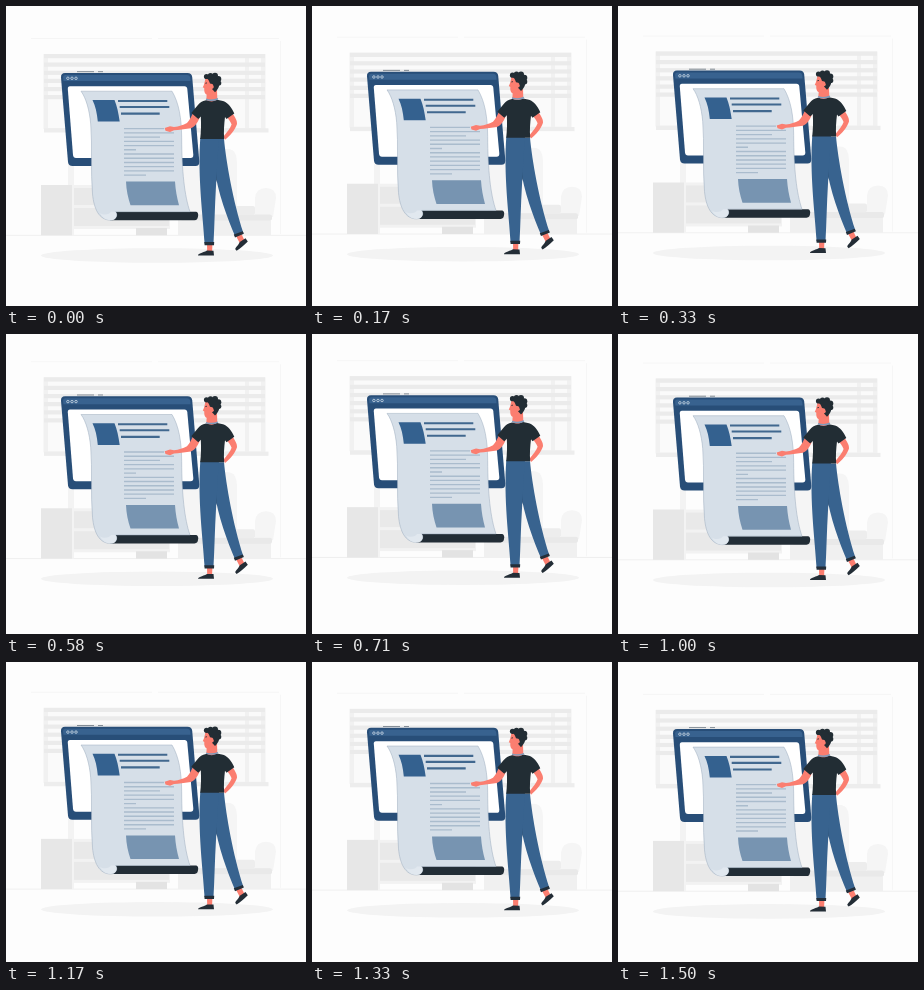
Write an HTML page that moves like this. It is 300 px wide and 300 px high and loops after 1540 ms.

```html
<!DOCTYPE html>
<html lang="en">
<head>
<meta charset="utf-8">
<title>Reading a page</title>
<style>
html, body { margin: 0; width: 100%; height: 100%; overflow: hidden; background: #fdfdfd; }
svg { display: block; width: 100vw; height: 100vh; }
</style>
</head>
<body>
<svg viewBox="0 0 300 300" xmlns="http://www.w3.org/2000/svg">
<g id="scene">
  <!-- room -->
  <g fill="none" stroke="#f4f4f4" stroke-width=".8">
    <path d="M25 32.5H146M152 32.5H273M274.5 35V228"/>
    <path d="M0 229.3H300" stroke="#ececec"/>
  </g>
  <rect x="37.500" y="48" width="222" height="75" fill="#f1f1f1"/>
  <rect x="42" y="52" width="197" height="70" fill="#fafafa"/>
  <rect x="243" y="52" width="12" height="70" fill="#fafafa"/>
  <g id="slats" fill="#ebebeb"></g>
  <rect x="38" y="122.300" width="224.500" height="4.200" fill="#ededed"/>

  <rect x="62" y="158" width="6" height="71" fill="#f3f3f3"/>
  <rect x="35" y="179" width="31" height="50.300" fill="#e7e7e7"/>
  <rect x="68" y="179" width="96" height="44" fill="#f2f2f2"/>
  <g fill="#e9e9e9">
    <rect x="68" y="182" width="95" height="17"/>
    <rect x="68" y="202" width="95" height="18"/>
    <rect x="130" y="222" width="31" height="7.300" fill="#e3e3e3"/>
  </g>
  <g fill="#f5f5f5">
    <path d="M176 212V165Q176 143 194 143H222Q231 143 231 158V212Z"/>
    <path d="M249 211V192Q250 182 260 182T270 192L267 211Z"/>
    <rect x="172" y="213" width="93" height="16.300" fill="#f0f0f0"/>
    <rect x="174" y="208.500" width="92" height="6" rx="2" fill="#e9e9e9"/>
    <rect x="225" y="200" width="24" height="9" rx="2" fill="#ededed"/>
  </g>
  <ellipse cx="151" cy="249.500" rx="116" ry="7.300" fill="#f3f3f3"/>

  <!-- browser window -->
  <path d="M71 65.700H88M92 65.700H97" stroke="#78828c" stroke-width=".9"/>
  <path d="M59 67H181.500Q185.700 67 186.200 71L193.300 155.500Q193.500 160 189.500 160H66.500Q62.400 160 62 156L55 71.500Q54.700 67 59 67Z" fill="#284e78"/>
  <path d="M59 69H181Q184 69 184.300 72L184.600 75H57.400L57.100 71.500Q57 69 59 69Z" fill="#38628f"/>
  <path d="M64 80.300H178.500Q181 80.300 181.300 83L187.300 148.800Q187.500 152 184.500 152H70Q67.300 152 67 149L61.800 83Q61.600 80.300 64 80.300Z" fill="#fff"/>
  <g fill="none" stroke="#dfe8f1" stroke-width=".7">
    <circle cx="61.900" cy="72.300" r="1.250"/>
    <circle cx="66" cy="72.300" r="1.250"/>
    <circle cx="70" cy="72.300" r="1.250"/>
  </g>

  <!-- paper scroll -->
  <path d="M104 205.700H190Q192.200 206 192.200 209Q192 214.200 188.500 214.200H104Z" fill="#222d36"/>
  <path d="M75 85.200H166C173 97 175.500 112 175.700 132C175.800 165 178.500 190 184 205.700H109.500C112.300 209 110 214.200 104.500 214.200C93 214 88 203 86.500 188C84.500 165 86.500 140 84.700 118C83.500 104 80 92 75 85.200Z" fill="#d6dfe8" stroke="#9aabbc" stroke-width=".5"/>
  <path d="M109.500 205.700C112.300 209 110 214.200 104.500 214.200C99 214 96 211 94 207C98 210 104 208 105 205.700Z" fill="#e1e8ef"/>
  <path d="M86.500 94H108.500C111 100 112.500 107 113.700 115.600H91.800C91 107 89.500 100 86.500 94Z" fill="#34618f"/>
  <path d="M112 95H161.300M113.700 101H163.300M115 107.600H153.700" stroke="#41688f" stroke-width="2.100"/>
  <path id="lines" stroke="#aabccd" stroke-width="1.350"/>
  <path d="M120 175.600H169C169.500 184 171 192 173 199.200H124.500C122 192 120.300 184 120 175.600Z" fill="#7794b1"/>

  <!-- person -->
  <g fill="#fb7e70">
    <path d="M201 237H206.500L206 246.500H201.200Z"/>
    <path d="M229.500 229L235 227L239 235.500L234.500 238.500Z"/>
    <path d="M188 105L194 111C191 118 188 122 183 122.500C178 123.500 173 123.700 168 124.300L164 126L159.500 124.700L158.700 122L164 120.300L168 121C173 120.500 177 119 181 117C184 114 185.500 110 188 105Z"/>
    <path d="M220 110L226 106.500C229 111 231.300 114.500 231 118C229 124 224 130 219 133.800L217.500 130.500C221 126 224.500 122 225.600 118.500C224.500 115.500 222 112.500 220 110Z"/>
  </g>
  <path d="M192 249.500C192 247.500 196 247.300 201 244.600L207.500 244.800L208 249.500Z" fill="#232d36"/>
  <path d="M229.300 243.200C229.500 240.800 232 240 233.800 236L239.500 232.300L241.800 235.500C238 239 234 243.200 230.600 244.700Z" fill="#232d36"/>
  <path d="M207 133H218C220 155 227 195 237.300 226.800L229 230C221.500 212 212 188 208 160Z" fill="#38638f"/>
  <path d="M208.300 149L211.300 177L208.800 170Z" fill="#294c70"/>
  <path d="M194.300 132H213C211.800 146 211.300 160 210 180C208.800 200 208.500 220 207.500 237.500H198.600C197 210 191.500 170 194.300 132Z" fill="#38638f"/>
  <path d="M198.300 236H208.200L208 239.200H198.600ZM227.800 228.500L236.800 225.200L237.900 227.800L229 231.400Z" fill="#232f3a"/>

  <path d="M200 94.300C196 95 194 96.500 191.500 99.500L185.300 107L192.300 113L194.800 110.500C195.300 119 195 126 194.200 133H218.200C217.500 125 218.200 118 219 111L220.500 113L228.300 107.500C225.500 101.500 222.500 97 217 95L211 93.700Z" fill="#222d34"/>
  <path d="M201 84H211L211.300 93.300C208 96 203.500 96 200.300 93.800Z" fill="#fb7e70"/>
  <path d="M200 93.300Q206 95.500 212 92.800" fill="none" stroke="#7d9cbc" stroke-width="1.500"/>
  <path d="M199.500 72C198.700 76 198.300 78.500 196.800 81.300L198.300 82.200C198 85.500 199 88.500 201.500 88.800C205 89 209 86 211 81L211.500 73Z" fill="#fb7e70"/>
  <g fill="#222d34">
    <circle cx="200.500" cy="70.500" r="2.600"/>
    <circle cx="204.500" cy="69.600" r="2.700"/>
    <circle cx="209" cy="69.800" r="3"/>
    <circle cx="212.300" cy="73" r="3"/>
    <circle cx="212.700" cy="77" r="2.600"/>
    <path d="M199 71.500C203 73 203 75 204 77.500L206.300 78C208 79 207.500 82 206 83L209 86.300C212 83.500 214 80 213.500 75L208 69Z"/>
    <path d="M199.300 77.300L201 76.900" stroke="#222d34" stroke-width=".8"/>
  </g>
  <circle cx="206.200" cy="81" r="1.500" fill="#fb7e70"/>
</g>
</svg>
<script>
const LOOP = 1540;
const scene = document.getElementById("scene");

document.getElementById("slats").innerHTML = [48, 56.5, 64.7, 72.8, 81, 89]
  .map(y => `<rect x="38" y="${y}" width="221" height="4.200"/>`).join("");

const ends = [158, 168, 154, 168, 168, 130, 168, 168, 168, 168, 168, 140];
document.getElementById("lines").setAttribute("d",
  ends.map((x, i) => `M118 ${(122.7 + i * 4.22).toFixed(2)}H${x}`).join(""));

// [time, lift]: steady rise, quicker drop that settles
const keys = [[0, 0], [330, 2.5], [580, 4.7], [710, 5.8], [760, 6],
  [1000, 3.5], [1170, 2.2], [1500, 0.1], [LOOP, 0]];

function lift(t) {
  const i = keys.findIndex(k => k[0] > t);
  const [t0, a] = keys[i - 1], [t1, b] = keys[i];
  return a + (b - a) * (t - t0) / (t1 - t0);
}

function draw(t) {
  scene.setAttribute("transform", `translate(0 ${(-lift(t)).toFixed(3)})`);
}

const start = performance.now();
function tick() {
  draw((performance.now() - start) % LOOP);
  requestAnimationFrame(tick);
}
draw(0);
requestAnimationFrame(tick);
</script>
</body>
</html>
```
